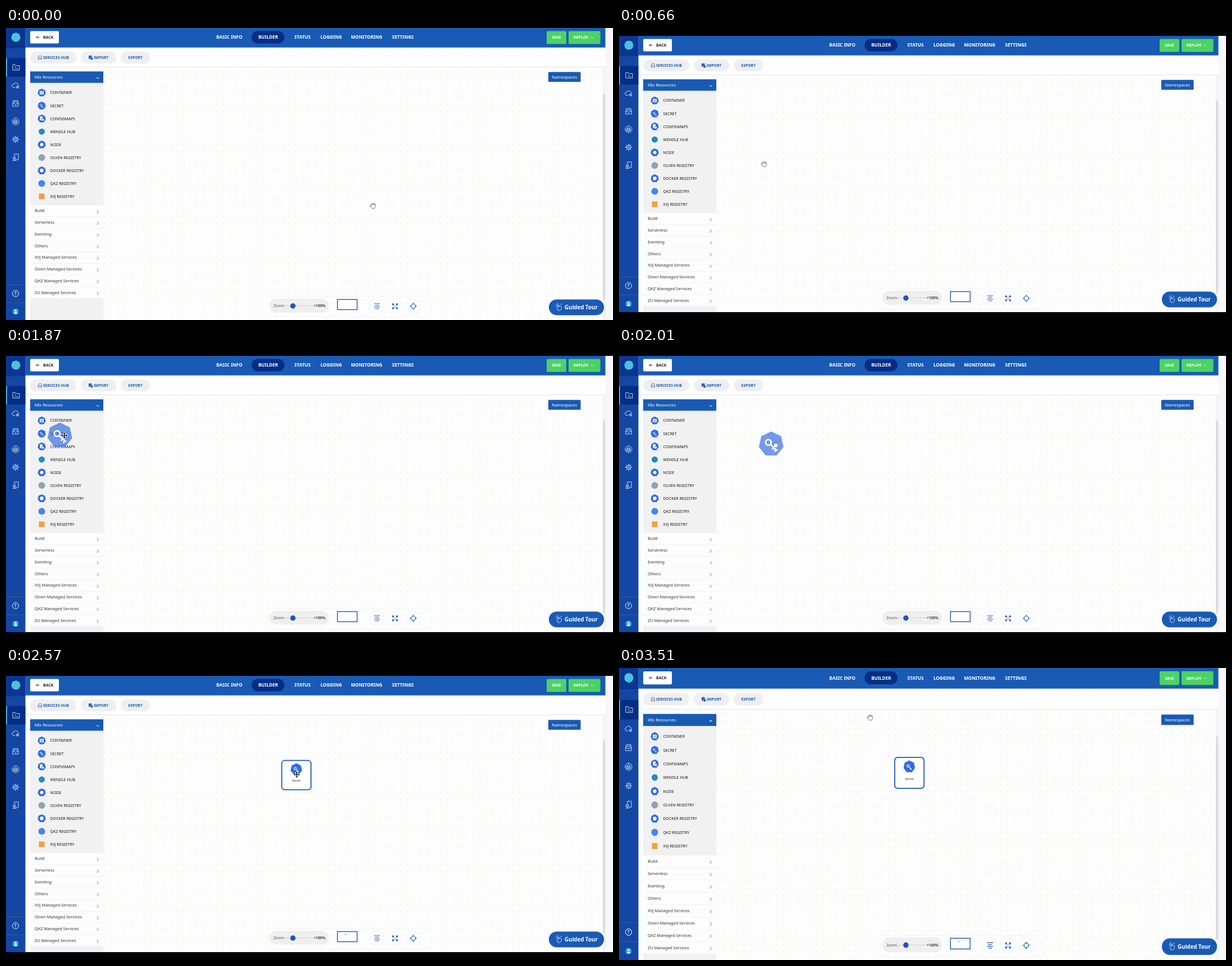
An HTML page for the animation above (3.54 s loop, 1079 px wide and 519 px high).

```html
<!DOCTYPE html>
<html lang="en">
<head>
<meta charset="utf-8">
<title>Service builder</title>
<style>
  html, body { margin: 0; width: 100%; height: 100%; overflow: hidden; background: #000; }
  svg { display: block; }
  text { font-family: "Noto Sans", "Open Sans", sans-serif; font-weight: 600; }
  .medium { font-weight: 500; }
  .line { fill: none; stroke-linecap: round; stroke-linejoin: round; }
</style>
</head>
<body>
<svg id="stage" width="1079" height="519" viewBox="0 0 1079 519">
  <defs>
    <pattern id="dots" x="174" y="77" width="11.7" height="11.7" patternUnits="userSpaceOnUse">
      <circle cx="1.5" cy="1.5" r=".75" fill="#e8e3c2"/>
    </pattern>
    <linearGradient id="shade" x2="0" y2="1">
      <stop stop-color="#0a3f94" stop-opacity=".15"/><stop offset="1" stop-color="#fff" stop-opacity="0"/>
    </linearGradient>
    <polygon id="hept" fill="#326ce5"/>
    <g id="key" class="line" stroke="#fff" stroke-width="2.700">
      <circle cx="-5" cy="-3" r="5"/><path d="M-1 1L10 11M5 6.500L2.500 9M9 10L6.500 12.500"/>
    </g>
    <g id="hand" class="line" stroke="#555" stroke-width=".8">
      <path fill="#fff" d="M-3 1V-3Q-2-4.500-1-3Q0-5.500 1-3.500Q2.500-5 3-2.800Q4.800-3.500 4.800-1.500V1.500Q4.500 5 1 5Q-2 5-3.500 2.500L-5 .5Q-5-1.500-3 .5"/>
      <path d="M-1-3V-1.500M1-3.500V-1.500M3-2.800V-1.500"/>
    </g>
    <path id="move" d="M0-5.500L2-3H.7V-.7H3V-2L5.500 0L3 2V.7H.7V3H2L0 5.500L-2 3H-.7V.7H-3V2L-5.500 0L-3-2V-.7H-.7V-3H-2Z"
      fill="#111" stroke="#fff" stroke-width="1.200" paint-order="stroke"/>
  </defs>
  <g id="view">
    <svg id="page" width="1079">
      <g id="top"></g>
      <g id="bottom"></g>
      <g id="card"></g>
    </svg>
  </g>
  <g id="drag">
    <use href="#hept" transform="scale(22.500)" opacity=".68"/>
    <use href="#key"/>
  </g>
  <use id="cursor"/>
</svg>
<script>
const $ = id => document.getElementById(id);
const BLUE = '#195ab5', NAVY = '#042e86', GRAY = '#f1f1f1', PILL = '#efeff0', GREEN = '#4bd364';

const rect = (x, y, w, h, fill, r = 0, extra = '') =>
  `<rect x="${x}" y="${y}" width="${w}" height="${h}" rx="${r}" fill="${fill}" ${extra}/>`;
const circle = (x, y, r, fill, extra = '') =>
  `<circle cx="${x}" cy="${y}" r="${r}" fill="${fill}" ${extra}/>`;
const label = (x, y, str, size, fill = '#fff', anchor = 'start', extra = '') =>
  `<text x="${x}" y="${y + size * .36}" font-size="${size}" fill="${fill}" text-anchor="${anchor}" ${extra}>${str}</text>`;
const line = (x, y, d, color, width = 1) =>
  `<path class="line" transform="translate(${x} ${y})" d="${d}" stroke="${color}" stroke-width="${width}"/>`;
const hept = (x, y, r, inner = '') =>
  `<g transform="translate(${x} ${y})"><use href="#hept" transform="scale(${r})"/>${inner}</g>`;
const smallKey = scale => `<use href="#key" transform="scale(${scale})"/>`;

const MEDIUM = 'class="medium"';
const DOWN = 'M-2-1L0 1L2-1', RIGHT = 'M-1-2.500L1.500 0L-1 2.500';

$('hept').setAttribute('points', Array.from({ length: 7 }, (_, i) => {
  const a = i * 2 * Math.PI / 7;
  return `${Math.sin(a)},${-Math.cos(a)}`;
}).join(' '));

function sidebar() {
  const icons = [
    [18, 70, 'M-6 4.500V-5H-2L-.5-3H6V4.500ZM-2-1L0 .7L-2 2.500M1 2.500H3'],
    [17, 102, 'M-1 3.500H-3.500A2.700 2.700 0 0 1-3.500-2A4 4 0 0 1 4-1.500Q5.500-1 5.500 0M1.500 1.500H5.500M1.500 3H5.500M1.500 4.500H5.500'],
    [17, 134, 'M-5 0L-4-5H4L5 0V5H-5ZM-5 0H-2L-1 2H1L2 0H5M-3-2.500H3'],
    [17, 166, 'M-6 0A6 6 0 1 1 6 0A6 6 0 1 1-6 0M-3-.5H3V3H-3ZM-2-.5V-2Q0-5 2-2V-.5M-1 1V3M1 1V3'],
    [17, 198, 'M-2 0A2 2 0 1 1 2 0A2 2 0 1 1-2 0M-4 0A4 4 0 1 1 4 0A4 4 0 1 1-4 0M0-6V-4M0 4V6M-6 0H-4M4 0H6M-4.300-4.300L-3-3M3 3L4.300 4.300M-4.300 4.300L-3 3M3-3L4.300-4.300'],
    [17, 230, 'M-2 0V-6H5V4H1M-4 0H0V3H-4ZM-2 3V5.500M-5 5.500H1']
  ];
  return rect(0, 0, 34.5, 519, '#1447a3') + rect(0, 0, 34.5, 36, '#0a3590') +
    circle(17.5, 16.5, 8, '#45c4dc') +
    rect(0, 53.5, 34.5, 33, NAVY) + rect(0, 53.5, 1.8, 33, '#47c4e8') +
    icons.map(([x, y, d]) => line(x, y, d, '#dbe6fa', .9)).join('');
}

function header() {
  const tabs = [['BASIC INFO', 397], ['BUILDER', 466], ['STATUS', 527], ['LOGGING', 578], ['MONITORING', 641], ['SETTINGS', 705.5]];
  return rect(34.5, 0, 1031, 34.6, BLUE) + rect(34.5, 34.6, 1031, 4, 'url(#shade)') +
    rect(43, 5.6, 51, 22, '#fff', 2) + line(56.5, 16.5, 'M2.500 0H-2.500M-.5-2L-2.500 0L-.5 2', '#222', .9) +
    label(66, 16.7, 'BACK', 7, '#222') +
    rect(436.5, 5.5, 58.5, 22, NAVY, 11) +
    tabs.map(([str, x]) => label(x, 16.5, str, 8.1, '#fff', 'middle')).join('') +
    rect(961, 5.5, 35, 23, GREEN, 2) + label(978.5, 17, 'SAVE', 6.7, '#fff', 'middle') +
    rect(1000, 5.5, 56.5, 23, GREEN, 2) + label(1022, 17, 'DEPLOY', 6.9, '#fff', 'middle') +
    line(1042, 17.5, 'M-1.500-.7L0 .8L1.500-.7', '#fff', .9);
}

function toolbar() {
  return rect(34.5, 69, 1031, 1, '#e2e6f0') +
    rect(43, 42, 82, 21, PILL, 10.5) + rect(133, 42, 63, 21, PILL, 10.5) + rect(204, 42, 52, 21, PILL, 10.5) +
    line(60.5, 52.5, 'M-3 0L-2-3H2L3 0V3H-3ZM-3 0H-1L0 1H1L3 0', BLUE, .7) +
    label(66, 52.5, 'SERVICES HUB', 6.55, BLUE) +
    rect(147, 49, 5.5, 6, BLUE, 1) + rect(150, 52, 4.5, 4.5, BLUE, .5, `stroke="${PILL}" stroke-width=".6"`) +
    label(156, 52.5, 'IMPORT', 6.55, BLUE) + label(230, 52.5, 'EXPORT', 6.55, BLUE, 'middle');
}

function resources() {
  const X = 63.5;
  const items = [
    ['CONTAINER', y => hept(X, y, 7.3, rect(-3.5, -3, 7, 6, '#fff', .5) + line(0, 0, 'M-2-1H2M-2 1H2', '#326ce5', .8))],
    ['SECRET', y => hept(X, y, 7.3, smallKey(.28))],
    ['CONFIGMAPS', y => hept(X, y, 7.3, rect(-3, -4, 4.5, 7, '#fff', .5) + rect(0, 0, 4, 4, '#fff', 1, 'stroke="#326ce5" stroke-width=".8"'))],
    ['WENDLE HUB', y => circle(X, y, 5.5, '#2389c7')],
    ['NODE', y => hept(X, y, 7.3, circle(0, 0, 3, '#fff'))],
    ['OLVEN REGISTRY', y => circle(X, y, 6, '#8fa5b0')],
    ['DOCKER REGISTRY', y => hept(X, y, 7.3, circle(0, 0, 3.2, '#fff'))],
    ['QKZ REGISTRY', y => circle(X, y, 6, '#4285f4')],
    ['XVJ REGISTRY', y => rect(X - 5, y - 5, 10, 10, '#eda246')]
  ];
  const sections = ['Build', 'Serverless', 'Eventing', 'Others', 'XVJ Managed Services',
    'Olven Managed Services', 'QKZ Managed Services', 'ZU Managed Services'];
  return rect(43, 97, 130, 422, GRAY) + rect(43, 77.2, 130, 20.3, BLUE) +
    label(51, 87.3, 'K8s Resources', 7.4, '#fff', 'start', MEDIUM) + line(163, 89, DOWN, '#fff') +
    items.map(([name, icon], i) => {
      const y = 115 + 23.05 * i;
      return icon(y) + label(78.5, y, name, 6.9, '#161616', 'start', MEDIUM);
    }).join('') +
    sections.map((name, i) => {
      const y = 315 + 20.75 * i;
      return rect(43, y, 130, 20.75, '#fdfdfe') + rect(43, y + 20.2, 130, .6, '#e4e7f3') +
        label(51, y + 9.8, name, 7.3, '#333', 'start', MEDIUM) + line(163, y + 11.5, RIGHT, '#666', .9);
    }).join('');
}

function bottomBar() {
  const ring = x => circle(x, -24.5, 13, '#fff', 'stroke="#eaeef6" stroke-width="1"');
  return rect(0, -63, 34.5, .7, '#3565b8') + rect(0, -31, 34.5, .7, '#3565b8') +
    circle(17, -47, 5.5, 'none', 'stroke="#e4edff" stroke-width="1"') + label(17, -47, '?', 8, '#e4edff', 'middle') +
    circle(17, -15, 5.5, '#2aa5dc') + circle(17, -16.5, 1.8, '#fff') + line(17, -12, 'M-2.500 0Q0-2.500 2.500 0Z', '#fff', 1.5) +
    rect(464, -42, 291, 36, '#fdfdfd', 4, 'stroke="#f3f3f5" stroke-width="1"') +
    rect(468, -38, 106, 25, PILL, 12.5) +
    label(475.5, -25.5, 'Zoom', 6.7, '#888') + label(495, -25.5, '-', 6.7, '#888') +
    rect(498, -25.6, 48, 1, '#d0d0cc') + circle(510, -25, 4.7, BLUE) +
    label(568, -25.5, '+100%', 6.6, '#444', 'end') +
    rect(589.2, -36.5, 35, 18, '#fff', 0, `stroke="${BLUE}" stroke-width="1.400"`) +
    [659, 691, 724].map(ring).join('') +
    line(659.5, -24.5, 'M-5-4.500H5M-3-1.500H3M-5 1.500H5M-3 4.500H3', BLUE, 1.2) +
    line(691.5, -24.5, 'M-4.500-2V-4.500H-2M-4.500-4.500L-1.500-1.500M2-4.500H4.500V-2M4.500-4.500L1.500-1.500M4.500 2V4.500H2M4.500 4.500L1.500 1.500M-2 4.500H-4.500V2M-4.500 4.500L-1.500 1.500', BLUE, 1.2) +
    circle(724, -24.5, 4, 'none', `stroke="${BLUE}" stroke-width="1.200"`) +
    line(724, -24.5, 'M0-6V-4M0 4V6M-6 0H-4M4 0H6', BLUE, 1.2) +
    rect(965, -36.5, 98, 28, BLUE, 14) +
    line(983.5, -22.5, 'M-3 5L-4 1Q-4-1-2 0L-3-4Q-2-6-1-4L0-1L0-3Q1-4 2-2L4-1Q5 2 2 5ZM-5-2Q-6-6-2-7M2-6L4-5', '#e8f0ff', .8) +
    label(993, -22.8, 'Guided Tour', 9.7);
}

$('top').innerHTML =
  rect(0, 0, 1079, 519, '#fdfdfd') + rect(174, 70, 887, 449, 'url(#dots)') +
  rect(1066, 0, 13, 519, '#f7f7f9') + rect(1061, 70, 5, 449, '#f3f3f4') +
  '<rect id="thumb" x="1061" width="4" rx="1" fill="#dcdcdc"/>' +
  sidebar() + header() + toolbar() + resources() +
  rect(964, 78.3, 57.5, 17.5, BLUE, 1.5) +
  label(992.7, 87, 'Namespaces', 7.5, '#fff', 'middle', MEDIUM);
$('bottom').innerHTML = bottomBar();
$('card').innerHTML =
  rect(490.2, 150.3, 52, 52, '#fff', 5, `stroke="${BLUE}" stroke-width="1.800"`) +
  hept(516, 165.8, 10.5, smallKey(.4)) +
  label(516, 186, 'Secret', 6, '#222', 'middle', 'style="font:400 6px Liberation Serif,serif"') +
  rect(602.5, 459.3, 2.5, 1, BLUE);

// Waypoints: time, x, y
const pointer = [
  [0, 652, 316], [90, 640, 326], [660, 258, 242], [1180, 80, 157], [1260, 79, 155], [1340, 78, 154],
  [1700, 78, 154], [1740, 84, 150], [1870, 102.5, 155.5], [2170, 476, 191], [2260, 491, 191],
  [2330, 517, 191], [2850, 516.5, 187.5], [3180, 455, 100], [3380, 455, 100], [3510, 446, 88], [3540, 446, 88]
];
const ghost = [[1740, 76, 149], [1870, 94.5, 155], [2170, 469, 188.5], [2260, 483, 188.5], [2330, 509, 189.5], [2570, 509, 189.5]];

function along(path, t) {
  const i = Math.max(1, path.findIndex(p => p[0] >= t));
  const [t0, x0, y0] = path[i - 1], [t1, x1, y1] = path[i];
  const k = (t - t0) / (t1 - t0);
  return [x0 + (x1 - x0) * k, y0 + (y1 - y0) * k];
}
const place = (id, [x, y]) => $(id).setAttribute('transform', `translate(${x} ${y})`);
const show = (id, on) => $(id).setAttribute('visibility', on ? 'visible' : 'hidden');

function draw(t) {
  const full = t < 90, stretched = t >= 2850, height = full ? 519 : 491;
  $('page').setAttribute('height', height);
  $('view').setAttribute('transform', stretched ? `scale(1 ${519 / 491})` : `translate(0 ${full ? 0 : 14})`);
  place('bottom', [0, height]);
  $('thumb').setAttribute('y', full ? 118 : 115);
  $('thumb').setAttribute('height', full ? 365 : 342);
  show('card', t >= 2570);

  const dragging = t >= 1740 && t < 2570;
  show('drag', dragging);
  if (dragging) place('drag', along(ghost, t));

  const [x, y] = along(pointer, t);
  const overCard = t >= 2570 && x > 489 && y > 157;
  $('cursor').setAttribute('href', x < 173 || overCard ? '#move' : '#hand');
  place('cursor', [x, y]);
}

function tick() {
  draw(performance.now() % 3540);
  requestAnimationFrame(tick);
}
tick();
</script>
</body>
</html>
```
